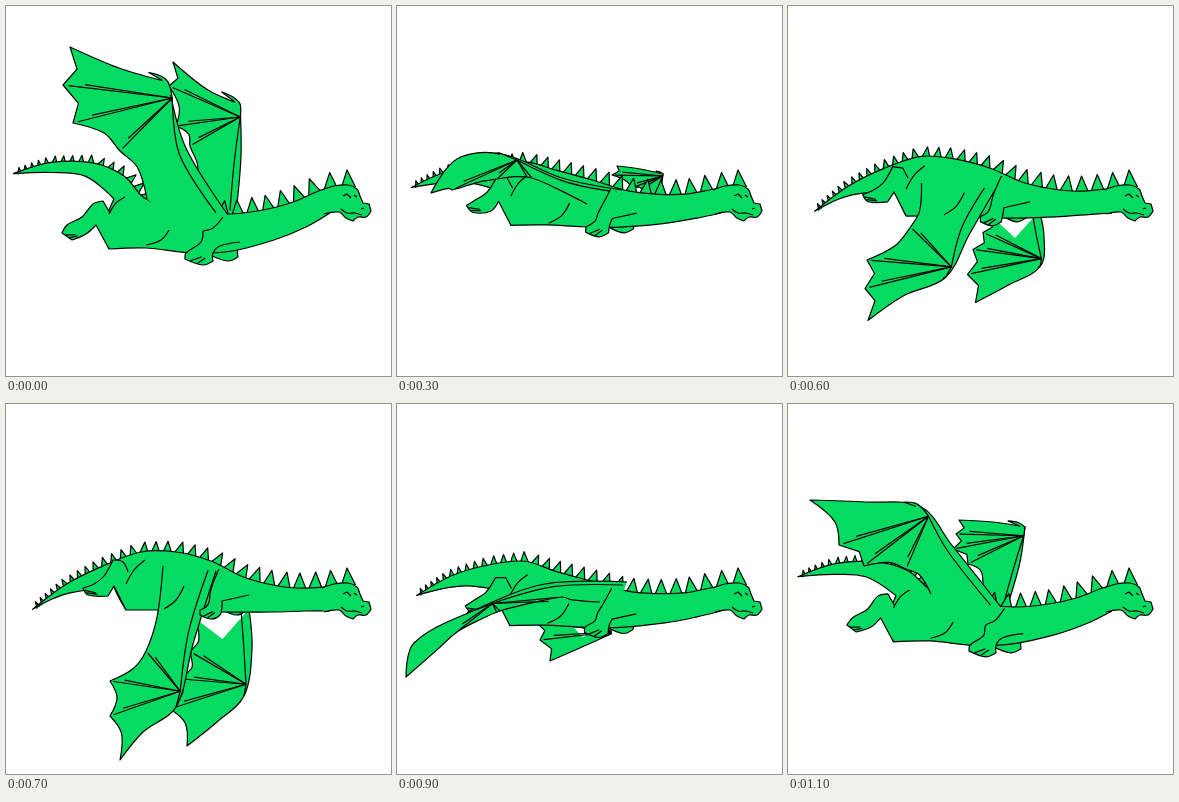
These frames come from a looping animation (385x370 px, 1200 ms). An HTML page with a canvas:

```html
<!DOCTYPE html>
<html>
<head>
<meta charset="utf-8">
<style>
html, body { margin: 0; height: 100%; overflow: hidden; background: #fff; }
canvas { display: block; }
</style>
</head>
<body>
<canvas id="stage" width="385" height="370"></canvas>
<script>
const ctx = document.getElementById('stage').getContext('2d');
const STEPS = 12, STEP_MS = 100;

const points = s => s.split(' ').map(p => p.split(',').map(Number));
const mix = (p, q, k) => [p[0] + (q[0] - p[0]) * k, p[1] + (q[1] - p[1]) * k];
const blend = (a, b, k) => a.map((p, i) => mix(p, b[i], k));
const toward = (p, q) => {
  const d = Math.hypot(q[0] - p[0], q[1] - p[1]) || 1;
  return [(q[0] - p[0]) / d, (q[1] - p[1]) / d];
};

// Each body part moves between two extremes: wings down, wings up.
const parts = {
  back: ['342,180 318,183 290,184 262,180 235,172 205,157 170,148 135,148',
         '342,180 318,183 290,195 262,203 225,208 180,205 140,193 118,170'],
  tail: ['95,163 60,181 27,206 45,196 65,189',
         '88,157 45,156 7,167 45,166 80,170'],
  belly: ['108,183 113,194 120,206 154,206 185,206 215,208 268,208 300,207 324,207',
          '108,193 100,215 103,243 140,242 185,247 226,245 268,234 300,221 324,207'],
  leg: ['122,168 117,158 107,156 98,172 88,180 77,184 82,191 102,192 108,182 120,206',
        '104,207 97,195 87,198 76,211 61,219 56,227 66,234 80,228 90,219 103,243'],
  arm: ['213,165 205,185 203,198 200,203 194,206 194,211 205,215 214,211 216,203 216,197 243,191',
        '217,211 207,222 197,225 195,236 180,247 179,253 197,259 207,255 207,247 214,240 234,236'],
  thigh: ['139,156 128,166 120,180', '119,191 110,197 103,208'],
  flank: ['178,182 170,196 158,205', '163,224 155,234 140,239']
};
for (const name in parts) parts[name] = parts[name].map(points);

// Wing joints: root, three fingers, tip, leading edge, wrist, elbow, shoulder.
const keys = [
  { lift: 1,
    near: '141,193 114,145 67,117 57,79 64,41 113,62 162,76 179,140 222,209',
    far: '190,190 184,140 170,120 163,80 167,56 202,84 234,98 235,150 230,207' },
  { lift: 0.78,
    near: '137,178 126,130 117,109 120,101 33,116 78,88 150,104 167,138 228,198',
    far: '205,185 182,150 178,137 176,113 183,92 215,104 250,117 247,155 238,190' },
  { lift: 0.36,
    near: '190,198 135,172 100,173 55,184 34,187 60,153 105,148 165,172 225,184',
    far: '250,183 245,183 235,182 215,169 220,160 243,163 266,168 265,176 263,184' },
  { lift: 0.22,
    near: '110,192 105,195 54,231 50,253 46,273 95,251 145,240 175,218 205,199',
    far: '215,203 205,205 195,212 195,232 194,251 230,240 267,228 266,216 260,205' },
  { lift: 0,
    near: '157,162 140,247 104,277 104,312 114,356 137,328 170,303 187,240 210,167',
    far: '190,215 185,248 175,275 164,305 181,342 211,318 238,292 246,245 243,205' },
  { lift: 0.42,
    near: '203,198 165,193 103,207 60,228 9,273 17,239 78,206 148,180 230,178',
    far: '160,205 150,208 138,217 143,236 153,257 185,243 214,230 214,222 212,212' },
  { lift: 0.86,
    near: '143,190 118,165 76,162 51,141 22,96 78,98 133,103 163,140 213,203',
    far: '195,180 180,160 165,145 168,130 171,116 205,118 237,123 232,158 221,197' }
].map(k => ({ lift: k.lift, near: points(k.near), far: points(k.far) }));

const head = points('316,184 328,180 342,179 351,183 354,190 357,197 363,198 365,205 360,211 352,211 347,215 340,212 333,206 318,208');
const face = ['337,190 341,188 345,192', '348,189 351,191', '335,203 341,207 349,207 356,209', '355,203 358,202'].map(points);

// Smooth open curve that keeps sharp turns as corners; the fill closes through the anchor.
function draw(pts, filled, anchor) {
  const dir = pts.map((p, i) => {
    if (!i || i === pts.length - 1) return [0, 0];
    const a = toward(pts[i - 1], p), b = toward(p, pts[i + 1]);
    return a[0] * b[0] + a[1] * b[1] < 0.6 ? [0, 0] : toward(pts[i - 1], pts[i + 1]);
  });
  const path = new Path2D();
  path.moveTo(...pts[0]);
  for (let i = 1; i < pts.length; i++) {
    const p = pts[i - 1], q = pts[i], a = dir[i - 1], b = dir[i];
    const r = Math.hypot(q[0] - p[0], q[1] - p[1]) / 3;
    path.bezierCurveTo(p[0] + a[0] * r, p[1] + a[1] * r, q[0] - b[0] * r, q[1] - b[1] * r, ...q);
  }
  if (filled) {
    const area = new Path2D(path);
    if (anchor) area.lineTo(...anchor);
    ctx.fill(area);
  }
  ctx.stroke(path);
}

// Spikes shrink and crowd together from the head to the tail tip.
function drawSpikes(back) {
  const count = 30;
  const lengths = back.slice(1).map((p, i) => Math.hypot(p[0] - back[i][0], p[1] - back[i][1]));
  const total = lengths.reduce((a, b) => a + b);
  for (let k = 0; k < count; k++) {
    const u = k / count, h = 4 + 12 * (1 - u), w = h * 0.46;
    let s = total * u * (1.5 - u / 2), i = 0;
    while (s > lengths[i]) s -= lengths[i++];
    const [x, y] = mix(back[i], back[i + 1], s / lengths[i]);
    const [dx, dy] = toward(back[i], back[i + 1]);
    const at = (along, up) => [x + dx * along - dy * up, y + dy * along + dx * up];
    draw([at(-w, -2), at(-1, h), at(w, -2)], true);
  }
}

function drawWing([root, ...rest], lift) {
  const [tip, lead, wrist, elbow, shoulder] = rest.slice(3);
  const fingers = rest.slice(0, 3);
  const hub = mix(wrist, elbow, 0.25);
  const rim = [root];
  for (const end of [...fingers, tip]) {
    rim.push(mix(mix(rim[rim.length - 1], end, 0.5), hub, 0.1), end);
  }
  const [ax, ay] = mix(root, shoulder, 0.5);
  draw([...rim, lead, wrist, elbow, shoulder], true, [ax, ay + 25]);

  for (const end of fingers) {
    const [dx, dy] = toward(hub, end);
    const [x, y] = mix(hub, end, 0.8);
    draw([hub, mix(hub, end, 0.95)]);
    draw([hub, [x - dy * 3, y + dx * 3]]);
  }
  draw([hub, mix(elbow, root, 0.15), mix(shoulder, root, 0.15)]);

  // Thumb claw, raised while the wing is up.
  const [cx, cy] = toward(wrist, lead), size = 20 * lift;
  const claw = (along, up) => [wrist[0] + cx * along * size, wrist[1] + cy * along * size - up * size];
  draw([claw(0.3, 0), claw(1, 0.2), claw(0.4, 0.2), wrist, hub], true);
}

function drawToes(from, to, ankle) {
  for (const k of [0.3, 0.7]) {
    const toe = mix(from, to, k);
    draw([toe, mix(toe, ankle, 0.5)]);
  }
}

function drawDragon(step) {
  const k = step ? (step + 1) / 2 : 0;
  const a = keys[Math.floor(k)], b = keys[Math.ceil(k)], part = k % 1;
  const lift = a.lift + (b.lift - a.lift) * part;
  const sway = 0.5 + 0.5 * Math.cos((step - 0.5) / STEPS * 2 * Math.PI);
  const pose = (name, amount = lift) => blend(...parts[name], amount);
  const back = pose('back'), tail = pose('tail', sway);
  const leg = pose('leg'), arm = pose('arm');

  drawWing(blend(a.far, b.far, part), lift);
  draw(arm.slice(3, 10).map(([x, y]) => [x + 25, y - 4]), true);
  drawSpikes([...back, ...tail.slice(0, 3)]);
  draw([...back, ...tail, ...pose('belly')], true);
  draw(leg, true);
  drawToes(leg[5], leg[6], leg[7]);
  draw(pose('thigh'));
  drawWing(blend(a.near, b.near, part), lift);
  draw(pose('flank'));
  draw(arm, true);
  drawToes(arm[5], arm[6], arm[8]);

  draw(head, true);
  face.forEach(line => draw(line));
}

const start = performance.now();
function tick() {
  ctx.fillStyle = '#fff';
  ctx.fillRect(0, 0, 385, 370);
  ctx.fillStyle = '#05db61';
  ctx.strokeStyle = '#000';
  ctx.lineWidth = 1.2;
  ctx.lineJoin = 'round';
  drawDragon(Math.floor((performance.now() - start) / STEP_MS) % STEPS);
  requestAnimationFrame(tick);
}
tick();
</script>
</body>
</html>
```
